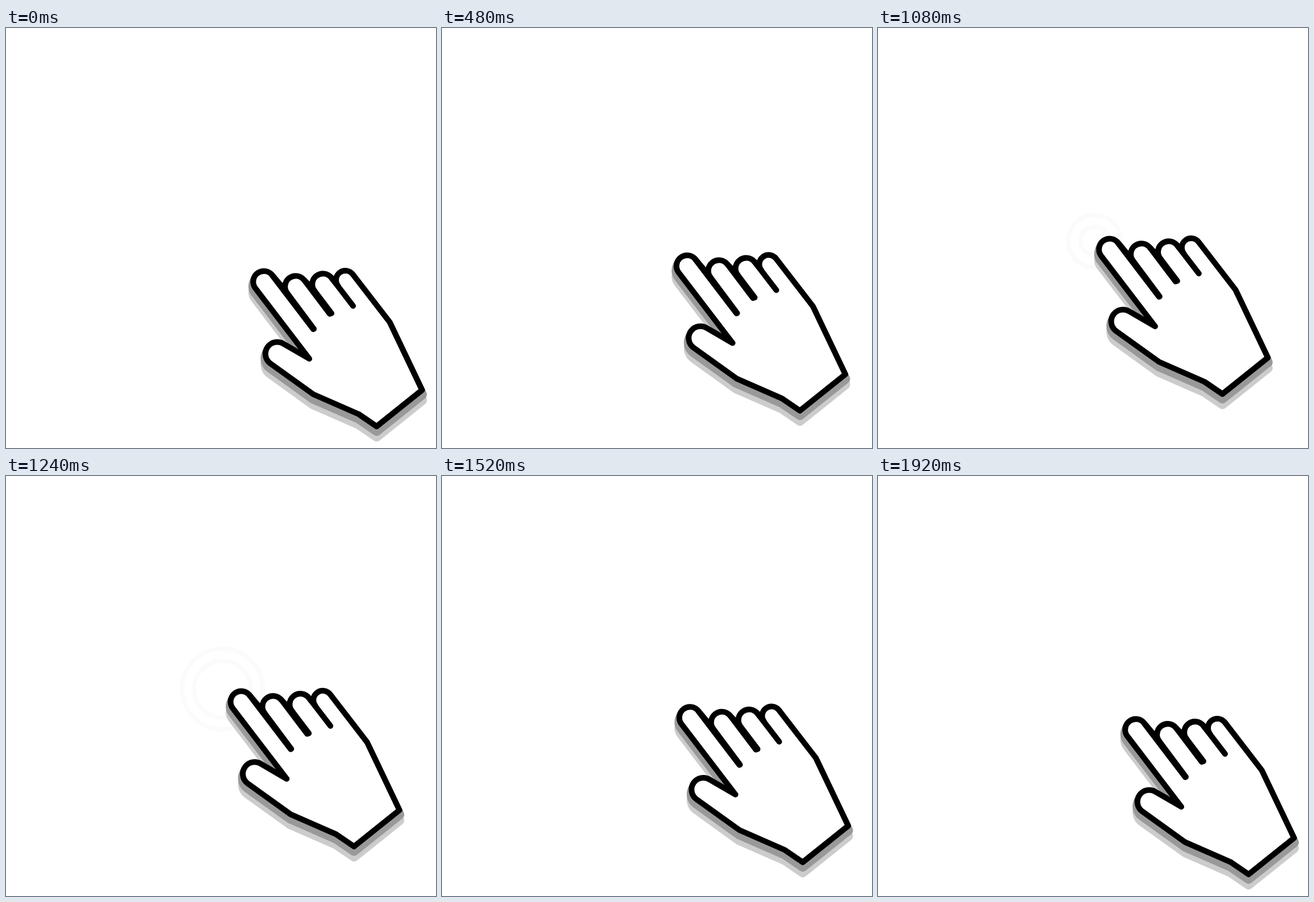
An HTML page with a canvas for the animation above (1960 ms loop, 757 by 739 pixels).

```html
<!DOCTYPE html>
<html lang="en">
<head>
<meta charset="utf-8">
<title>Clicking hand</title>
<style>
html, body { margin: 0; width: 100%; height: 100%; overflow: hidden; background: #fff; }
canvas { display: block; width: 757px; height: 739px; }
</style>
</head>
<body>
<canvas id="stage" width="757" height="739"></canvas>
<script>
const ctx = document.getElementById('stage').getContext('2d');
const LOOP = 1960, STEP = 40;

// [time, rise of the hand in px]
const keys = [
  [0, 0], [80, 0.2], [270, 5], [480, 27.7], [560, 37], [760, 53.5],
  [970, 58], [1080, 57], [1400, 36], [1680, 4.6], [1880, 0.2], [1960, 0]
];

const slope = (a, b) => (b[1] - a[1]) / (b[0] - a[0]);

function tangent(i) {
  if (i === 0 || i === keys.length - 1) return 0;
  const a = slope(keys[i - 1], keys[i]), b = slope(keys[i], keys[i + 1]);
  return a * b <= 0 ? 0 : 2 * a * b / (a + b);
}

function riseAt(t) {
  let i = 0;
  while (i < keys.length - 2 && t >= keys[i + 1][0]) i++;
  const [t0, y0] = keys[i], [t1, y1] = keys[i + 1];
  const h = t1 - t0, u = (t - t0) / h, v = 1 - u;
  return y0 * v * v * (1 + 2 * u) + y1 * u * u * (3 - 2 * u)
    + h * u * v * (v * tangent(i) - u * tangent(i + 1));
}

const TILT = Math.atan2(0.608, -0.794);

function cap(path, x, y, r, from = TILT, to = TILT + Math.PI) {
  path.arc(x, y, r, from, to);
}

function makeOutline() {
  const p = new Path2D();
  p.moveTo(534, 582);
  cap(p, 454, 446.5, 18.8);
  cap(p, 510, 455, 18.8);
  cap(p, 558, 451, 18.8);
  cap(p, 597.5, 443.5, 16.5);
  for (const [x, y] of [[675.5, 517.5], [732.5, 637], [652.5, 701], [621, 679.5], [541, 644.5]]) p.lineTo(x, y);
  cap(p, 477.5, 573.3, 20.8, Math.atan2(0.8, -0.6), Math.atan2(-0.856, 0.516) + 2 * Math.PI);
  p.closePath();
  return p;
}

function makeCreases() {
  const p = new Path2D();
  const line = (a, b, c, d) => { p.moveTo(a, b); p.lineTo(c, d); };
  line(468.5, 435, 541, 530);
  line(495, 466.5, 542, 529.5);
  line(525, 443.5, 570, 503);
  line(543, 462.5, 573, 502);
  line(573, 439.5, 611, 489);
  return p;
}

const outline = makeOutline(), creases = makeCreases();

function shadow(dy, color) {
  ctx.save();
  ctx.translate(0, dy);
  ctx.fillStyle = ctx.strokeStyle = color;
  ctx.lineWidth = 17;
  ctx.fill(outline);
  ctx.stroke(outline);
  ctx.restore();
}

function drawHand(rise) {
  ctx.save();
  ctx.translate(-0.81 * rise, -rise);
  ctx.lineJoin = ctx.lineCap = 'round';
  shadow(18, '#ccc');
  shadow(8, '#999');
  ctx.fillStyle = '#fff';
  ctx.strokeStyle = '#000';
  ctx.lineWidth = 10;
  ctx.fill(outline);
  ctx.stroke(outline);
  ctx.stroke(creases);
  ctx.restore();
}

function ring(t, start, span, reach, width) {
  const u = (t - start) / span;
  if (u <= 0 || u >= 1) return;
  ctx.globalAlpha = 0.014 * Math.min(1, u * 5, (1 - u) * 5);
  ctx.strokeStyle = '#000';
  ctx.lineWidth = width;
  ctx.beginPath();
  ctx.arc(381, 375, reach * u, 0, 2 * Math.PI);
  ctx.stroke();
  ctx.globalAlpha = 1;
}

function draw(t) {
  ctx.fillStyle = '#fff';
  ctx.fillRect(0, 0, 757, 739);
  ring(t, 780, 680, 105, 8);
  ring(t, 920, 480, 75, 8);
  drawHand(riseAt(t));
}

const begin = performance.now();
function tick() {
  const t = (performance.now() - begin) % LOOP;
  draw(Math.floor(t / STEP) * STEP);
  requestAnimationFrame(tick);
}
tick();
</script>
</body>
</html>
```
